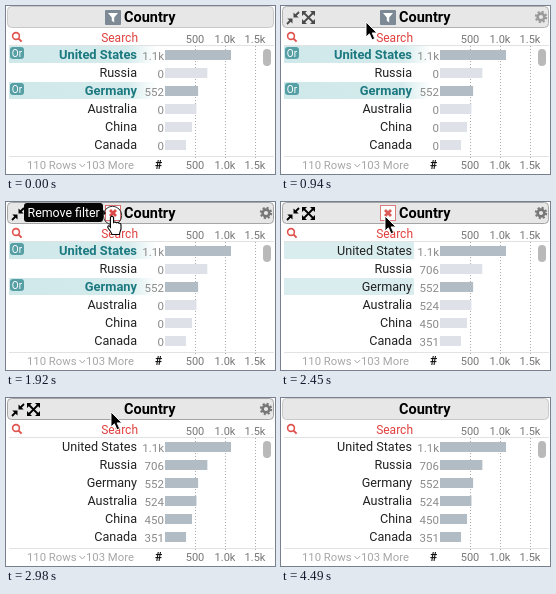
An HTML page that plays this animation: 269x168 px, repeating every 4730 ms.

```html
<!DOCTYPE html>
<html lang="en">
<head>
<meta charset="utf-8">
<title>Country filter</title>
<style>
html, body { margin: 0; width: 100%; height: 100%; overflow: hidden; background: #fff; }
svg { display: block; width: 100vw; height: 100vh; font-family: Roboto, "Liberation Sans", sans-serif; }
.end { text-anchor: end; }
.mid { text-anchor: middle; }
.tick { font-size: 11px; fill: #777; }
.count { font-size: 11.5px; fill: #8a8a8a; }
.foot { font-size: 11.3px; fill: #a6a6a6; }
.label { font-size: 12.6px; fill: #222; }
.picked { font-size: 12.9px; font-weight: 700; fill: #1c7980; }
</style>
</head>
<body>
<svg viewBox="0 0 269 168" xmlns="http://www.w3.org/2000/svg">
  <defs>
    <linearGradient id="fade">
      <stop offset="0" stop-color="#cfe8ea"/>
      <stop offset=".8" stop-color="#d5ebec"/>
      <stop offset="1" stop-color="#fff"/>
    </linearGradient>
  </defs>
  <rect width="269" height="168" fill="#fff"/>
  <rect id="header" x="1.5" y=".5" width="266" height="21" rx="4" fill="#e7e7e7" stroke="#c9c9c9"/>
  <text x="118" y="16" font-size="14.5" font-weight="700" fill="#000">Country</text>

  <g id="funnel">
    <rect x="99" y="4" width="16" height="15" rx="1" fill="#7d8a96"/>
    <path d="M102 7h10l-3.8 4.6v5l-2.4-1.8v-3.2z" fill="#fff"/>
  </g>
  <g id="clear">
    <rect x="99.5" y="3.5" width="15" height="15" fill="#fff" stroke="#d9706f"/>
    <path d="M104 8l6 6m0-6l-6 6" stroke="#d94a48" stroke-width="2.8"/>
  </g>

  <g id="tools">
    <g stroke="#000" stroke-width="1.8" fill="#000">
      <path d="M6 18l3.5-3.5M18 6l-3.5 3.5" fill="none"/>
      <path d="M6.3 12.4h5.2v5.2zM17.7 11.6h-5.2v-5.2z" stroke="none"/>
      <path d="M23 7l9 9m0-9l-9 9" fill="none"/>
      <path d="M21 5h5l-5 5zM34 5h-5l5 5zM21 18h5l-5-5zM34 18h-5l5-5z" stroke="none"/>
    </g>
    <g fill="none" stroke="#777">
      <circle cx="260" cy="11" r="3.4" stroke-width="2.6"/>
      <circle cx="260" cy="11" r="5.2" stroke-width="2" stroke-dasharray="2.1 1.984"/>
    </g>
  </g>

  <g fill="none" stroke="#e0524e">
    <circle cx="10" cy="30" r="3.4" stroke-width="1.6"/>
    <path d="M12.6 32.6l3 3" stroke-width="2"/>
  </g>
  <text x="132" y="36" class="end" font-size="12" fill="#e0403e">Search</text>
  <path d="M3 39.5h265M3 150.5h265" stroke="#e2e2e2"/>
  <g id="axis"></g>
  <g id="rows"></g>
  <rect x="257" y="43" width="8" height="17" rx="4" fill="#b9b9b9"/>

  <text x="21" y="163" class="foot">110 Rows</text>
  <path d="M73.5 158l2.8 3 2.8-3" fill="none" stroke="#a6a6a6"/>
  <text x="80" y="163" class="foot">103 More</text>
  <text x="152.7" y="163" class="mid" font-size="12" font-weight="700" fill="#111">#</text>

  <g id="tip">
    <path d="M21 1h73q3 0 3 3v4l3 3-3 3v3q0 3-3 3h-73q-3 0-3-3v-13q0-3 3-3z" fill="#050505"/>
    <text x="21.5" y="15" font-size="12.4" fill="#fff">Remove filter</text>
  </g>
  <circle id="ring" cx="106.5" cy="13.5" r="9.2" fill="none" stroke="#333"/>
  <g id="cursor">
    <path id="arrow" d="M0 0v15l3.4-3.2 2.6 6 2.7-1.2-2.6-5.7h4.8z" fill="#000" stroke="#fff" stroke-width=".9"/>
    <path id="hand" d="M-1.6 1.5q1.6-2.8 3.2 0v5q1.5-1.2 2.8.3 1.6-.9 2.6.5 2-.3 2 1.7v4q-1 2.5-1.6 5.5h-7.4q-1-3-4-6.5-.8-2.6 1.4-2l1 1.2z" fill="#fff" stroke="#000" stroke-width="1.1"/>
  </g>
</svg>
<script>
const LOOP = 4730;
const CLEARED = 2340;
const ORIGIN = 159, SCALE = 0.06;
const data = [
  ["United States", 1100, "1.1k", true],
  ["Russia", 706, "706"],
  ["Germany", 552, "552", true],
  ["Australia", 524, "524"],
  ["China", 450, "450"],
  ["Canada", 351, "351"]
];
// time, x, y of the pointer tip
const path = [
  [600, 70, -20], [940, 85, 16], [1100, 92, 17], [1400, 106, 14],
  [2339, 106, 14], [2340, 104, 14], [2450, 104, 14], [2860, 105, 14],
  [3280, 105, 14], [3340, 102, 19], [3500, 80, -20]
];

const $ = id => document.getElementById(id);
const show = (el, opacity) => el.setAttribute("opacity", opacity);
const ramp = (t, a, b) => Math.min(1, Math.max(0, (t - a) / (b - a)));
const mix = (a, b, k) => a + (b - a) * k;
const blend = (a, b, k) => `rgb(${a.map((v, i) => Math.round(mix(v, b[i], k)))})`;

function add(parent, tag, attrs, text) {
  const el = document.createElementNS("http://www.w3.org/2000/svg", tag);
  for (const key in attrs) el.setAttribute(key, attrs[key]);
  if (text) el.textContent = text;
  parent.append(el);
  return el;
}

["500", "1.0k", "1.5k"].forEach((text, i) => {
  const x = ORIGIN + 30 * (i + 1);
  for (const y of [37, 163]) add($("axis"), "text", { x, y, class: "tick mid" }, text);
  add($("axis"), "path", { d: `M${x + .5} 40V153`, stroke: "#aaa", "stroke-dasharray": "1 2" });
});

const rows = data.map(([name, value, short, picked], i) => {
  const y = 40 + 18 * i, g = $("rows");
  const row = { picked, short };
  if (picked) {
    row.shade = add(g, "rect", { x: 3, y, height: 17 });
    row.badge = add(g, "g", {});
    add(row.badge, "rect", { x: 4, y: y + 1, width: 14, height: 12, rx: 3, fill: "#569fa4" });
    add(row.badge, "text", { x: 11, y: y + 10.5, class: "mid", "font-size": 10, fill: "#fff" }, "Or");
  }
  row.label = add(g, "text", { x: 131, y: y + 13 }, name);
  row.count = add(g, "text", { x: 158, y: y + 14, class: "count end" });
  row.bar = add(g, "rect", { x: ORIGIN, y: y + 4, width: value * SCALE, height: 10 });
  return row;
});

function pointer(t) {
  const i = path.findIndex(p => p[0] > t);
  if (i < 1) return null;
  const [a, b] = [path[i - 1], path[i]];
  const k = ramp(t, a[0], b[0]);
  return [mix(a[1], b[1], k), mix(a[2], b[2], k)];
}

function draw(t) {
  const hover = ramp(t, 690, 1060) * (1 - ramp(t, 3380, 3820));
  show($("tools"), hover);
  $("header").setAttribute("stroke", blend([201, 201, 201], [165, 165, 165], hover));

  const swap = ramp(t, 1200, 1400);
  show($("funnel"), t < CLEARED ? 1 - swap : 0);
  show($("clear"), swap * (1 - ramp(t, 2400, 2860)));
  show($("tip"), ramp(t, 1300, 1560) * (1 - ramp(t, CLEARED, 2440)));
  show($("ring"), t >= 1920 && t < 2040 ? 1 : 0);

  const cleared = t >= CLEARED;
  const shade = 1 - ramp(t, 2400, 2860);
  const tint = ramp(t, 2450, 2980);
  for (const row of rows) {
    const on = row.picked && !cleared;
    row.label.setAttribute("class", (on ? "picked" : "label") + " end");
    row.count.textContent = row.picked || cleared ? row.short : "0";
    row.bar.setAttribute("fill", blend(row.picked ? [177, 188, 197] : [222, 226, 232], [177, 188, 197], tint));
    if (row.picked) {
      row.shade.setAttribute("fill", cleared ? "#d5ebec" : "url(#fade)");
      row.shade.setAttribute("width", cleared ? 130 : 147);
      show(row.shade, shade);
      show(row.badge, on ? 1 : 0);
    }
  }

  const p = pointer(t);
  show($("cursor"), p ? 1 : 0);
  if (p) $("cursor").setAttribute("transform", `translate(${p})`);
  const hand = t >= 1340 && !cleared;
  show($("hand"), hand ? 1 : 0);
  show($("arrow"), hand ? 0 : 1);
}

const start = performance.now();
function tick() {
  draw((performance.now() - start) % LOOP);
  requestAnimationFrame(tick);
}
tick();
</script>
</body>
</html>
```
